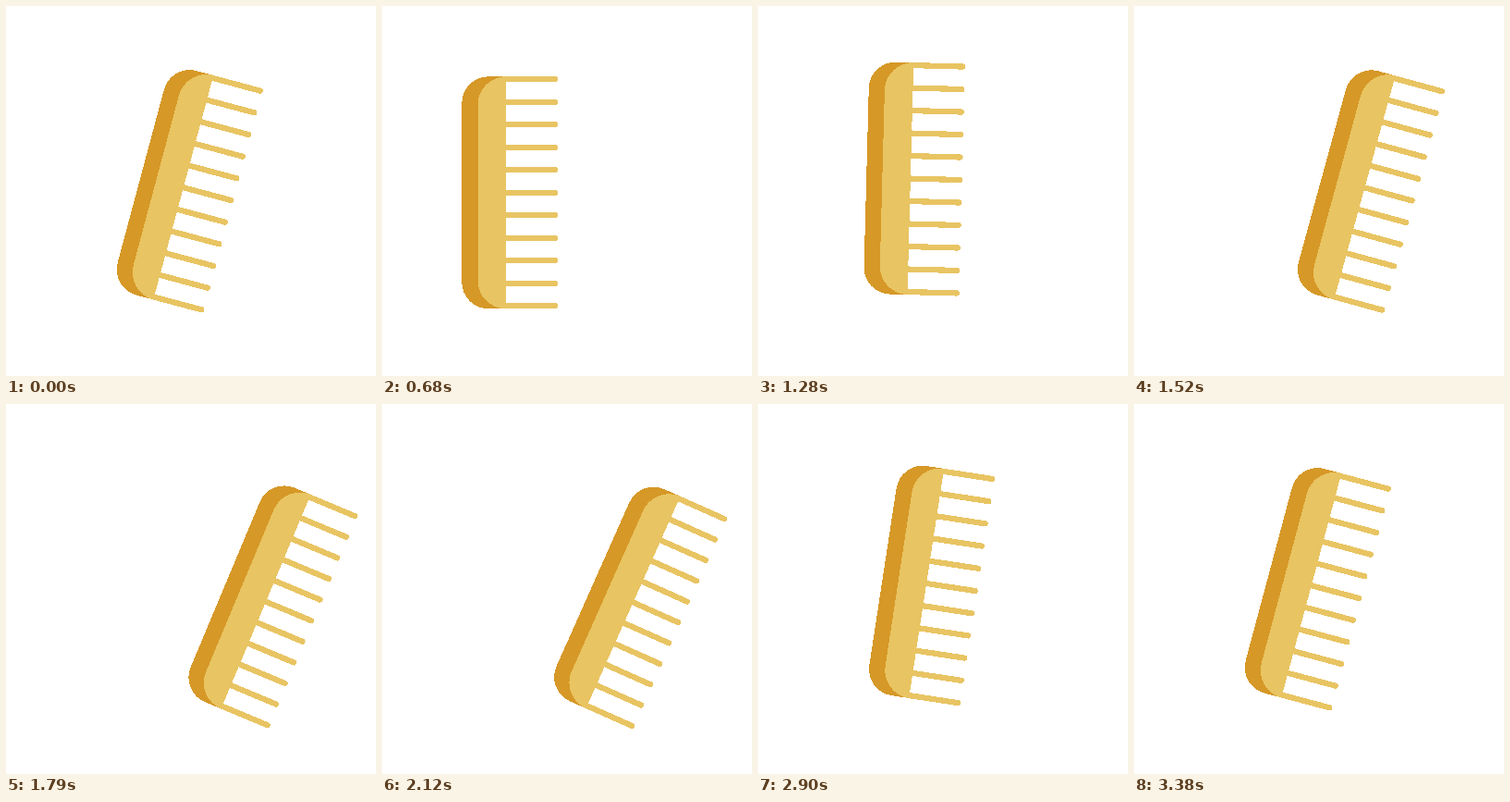
Animation, 400 px wide and 400 px high, one loop 3560 ms. Source, as an HTML page:

```html
<!DOCTYPE html>
<html lang="en">
<head>
<meta charset="utf-8">
<title>Comb</title>
<style>
  html, body { margin: 0; width: 100%; height: 100%; overflow: hidden; background: #fff; }
  svg { display: block; width: 100%; height: 100%; }
</style>
</head>
<body>
<svg viewBox="0 0 400 400">
  <g id="comb" shape-rendering="crispEdges">
    <path fill="#d69827" d="M-4-125.5H-23A28.7 28.7 0 0 0-51.7-96.8V96.8A28.7 28.7 0 0 0-23 125.5H-4Z"/>
    <path fill="#e8c462" d="M-4-125.5A30.5 30.5 0 0 0-34.5-95V95A30.5 30.5 0 0 0-4 125.5Z"/>
    <path id="teeth" stroke="#e8c462" stroke-width="6.2" stroke-linecap="round"/>
  </g>
</svg>
<script>
const LOOP = 3560, START = 500, END = 3380, STEP = 30;

// Key poses of the combing stroke: x and y of the centre, angle in degrees.
const rest = { x: 195.7, y: 197.3, angle: 15 };
const poses = [
  { t: START, ...rest },
  { t: 680, x: 138, y: 201.8, angle: 0 },
  { t: 815, x: 100.6, y: 211.6, angle: -9.8 },
  { t: 1040, x: 102.7, y: 210.6, angle: -9.4 },
  { t: 1340, x: 190, y: 184, angle: 5 },
  { t: 1520, x: 253.3, y: 197.5, angle: 15.3 },
  { t: 1900, x: 288.5, y: 218, angle: 23.8 },
  { t: 2120, x: 275.2, y: 216.1, angle: 24 },
  { t: 2540, x: 176, y: 193.6, angle: 5.2 },
  { t: 2900, x: 186.1, y: 194.6, angle: 8.7 },
  { t: END, ...rest }
];

function slope(key, i) {
  const from = poses[i], to = poses[i + 1];
  return from && to ? (to[key] - from[key]) / (to.t - from.t) : 0;
}

// Flat at turning points, harmonic mean of the neighbouring slopes elsewhere.
function tangent(key, i) {
  const a = slope(key, i - 1), b = slope(key, i);
  return a * b > 0 ? 2 * a * b / (a + b) : 0;
}

function sample(key, t) {
  const next = poses.findIndex(pose => pose.t > t);
  if (next < 0) return rest[key];
  const i = next - 1, from = poses[i], to = poses[next];
  const span = to.t - from.t, u = (t - from.t) / span, w = 1 - u;
  return from[key] + (to[key] - from[key]) * u * u * (3 - 2 * u)
    + span * u * w * (w * tangent(key, i) - u * tangent(key, next));
}

const comb = document.getElementById('comb');
document.getElementById('teeth').setAttribute('d',
  Array.from({ length: 11 }, (_, i) => `M-6 ${24.5 * (i - 5)}H49`).join(''));

function draw(now) {
  const elapsed = Math.min(END, Math.max(START, now % LOOP));
  const t = START + STEP * Math.floor((elapsed - START) / STEP);
  comb.setAttribute('transform',
    `translate(${sample('x', t)} ${sample('y', t)}) rotate(${sample('angle', t)})`);
}

let begin;
function tick(now) {
  begin ??= now;
  draw(now - begin);
  requestAnimationFrame(tick);
}
draw(0);
requestAnimationFrame(tick);
</script>
</body>
</html>
```
